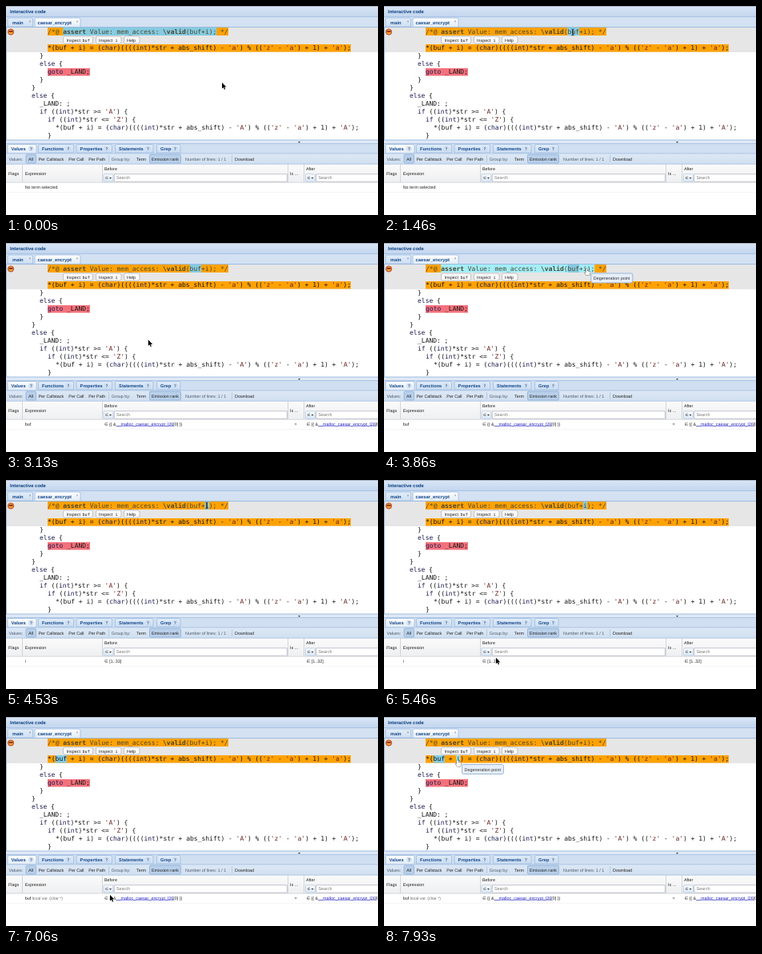
Recreate the animation shown at these times as an HTML page with a canvas. Size 465 px wide and 262 px high, loop 8000 ms.

```html
<!DOCTYPE html>
<html lang="en">
<head>
<meta charset="utf-8">
<title>Interactive code</title>
<style>
html, body { margin: 0; width: 100%; height: 100%; overflow: hidden; background: #fff; }
canvas { display: block; width: 465px; height: 262px; }
</style>
</head>
<body>
<canvas id="stage"></canvas>
<script>
const LOOP = 8000, W = 465, H = 262, PITCH = 4.8;
const SANS = '"Liberation Sans", Arial, sans-serif';
const MONO = '"DejaVu Sans Mono", monospace';
const BLUE = '#15498b', LINE = '#9dbbe0', HOVER = '#a3eef7', SELECTED = '#85cbe0', ORANGE = '#ffa200';

const canvas = document.getElementById('stage');
const ctx = canvas.getContext('2d');
const scale = window.devicePixelRatio || 1;
canvas.width = W * scale;
canvas.height = H * scale;

// Highlightable terms: x, y, width, height
const terms = {
  buf1: [229.6, 27, 14.4, 10],
  i1: [248.8, 27, 4.8, 10],
  assert: [71.2, 27, 192, 10],
  buf2: [61.6, 48, 14.4, 9.5],
  i2: [90.4, 48, 4.8, 9.5],
  assign: [52, 48, 379, 9.5]
};

// Pointer path: time, x, y, shape on arrival
const path = [
  [0, 270, 96, 'arrow'], [600, 270, 96, 'arrow'],
  [1250, 236, 33, 'beam'], [1750, 236, 33, 'beam'],
  [2250, 97.5, 215, 'arrow'], [2750, 97.5, 215, 'arrow'],
  [3500, 254.3, 32, 'hand'], [3950, 254.3, 32, 'hand'],
  [4150, 251, 32, 'beam'], [4650, 251, 32, 'beam'],
  [5200, 140, 223, 'arrow'], [5450, 140, 223, 'arrow'],
  [6000, 70, 51, 'hand'], [6650, 70, 51, 'hand'],
  [7050, 130, 223, 'arrow'], [7250, 130, 223, 'arrow'],
  [7700, 93, 53.5, 'hand'], [LOOP, 93, 53.5, 'hand']
];
const tooltips = [[3600, 3980], [6130, 6640], [7780, LOOP]];
const selections = [[0, 'assert'], [1400, 'buf1'], [4350, 'i1'], [6550, 'buf2']];
const results = [[0, 'none'], [1650, 'buf'], [4400, 'i'], [6650, 'local']];

const stateAt = (list, t) => list.filter(([start]) => start <= t).pop()[1];

function rect(x, y, w, h, fill, stroke, radius = 0) {
  ctx.beginPath();
  ctx.roundRect(x, y, w, h, radius);
  if (fill) { ctx.fillStyle = fill; ctx.fill(); }
  if (stroke) { ctx.strokeStyle = stroke; ctx.lineWidth = 0.8; ctx.stroke(); }
}

function shade(x, y, w, h, top, bottom, stroke, radius) {
  const g = ctx.createLinearGradient(0, y, 0, y + h);
  g.addColorStop(0, top);
  g.addColorStop(1, bottom);
  rect(x, y, w, h, g, stroke, radius);
}

function text(str, x, y, { size = 5.4, color = '#222', weight = '', family = SANS } = {}) {
  ctx.font = `${weight} ${size}px ${family}`;
  ctx.fillStyle = color;
  ctx.fillText(str, x, y);
  return x + ctx.measureText(str).width;
}

function code(str, x, y) {
  for (const m of str.matchAll(/'.'|\w+|[^\w\s']+/g)) {
    const color = m[0][0] === "'" ? '#6a2020' : /^(if|else|goto|int|char)$/.test(m[0]) ? '#1c1c50' : '#151515';
    text(m[0], x + m.index * PITCH, y, { size: 8, family: MONO, color });
  }
}

function triangle(x, y) {
  ctx.fillStyle = '#333';
  ctx.beginPath();
  ctx.moveTo(x, y);
  ctx.lineTo(x + 3, y);
  ctx.lineTo(x + 1.5, y + 1.8);
  ctx.fill();
}

function topPanel() {
  shade(0, 0, W, 13, '#d9e6f6', '#c3d6ee');
  rect(0, 0, W, 1, '#aab6c6');
  text('Interactive code', 5, 8.7, { size: 5.9, weight: 'bold', color: '#0b3f80' });
  rect(0, 13, W, 14, '#d3e1f2');
  rect(0, 13, W, 0.7, LINE);
  shade(2, 15, 31.5, 11, '#e2edf9', '#cfdff2', LINE, [2, 2, 0, 0]);
  shade(36, 15, 57, 12, '#ffffff', '#dfeaf7', LINE, [2, 2, 0, 0]);
  const label = { size: 5.8, weight: 'bold', color: BLUE };
  text('main', 8, 22.6, label);
  text('caesar_encrypt', 39.5, 22.6, label);
  text('×', 28.5, 20.5, { size: 5, color: '#777' });
  text('×', 87.5, 20.5, { size: 5, color: '#777' });
  rect(0, 26, W, 1, LINE);
}

function codePanel(hover, selected) {
  rect(0, 27, W, 141, '#fff');
  rect(0, 27, W, 31, '#e6e6e6');
  rect(52, 27, 226, 10, ORANGE);
  rect(52, 48, 379, 9.5, ORANGE);
  rect(52, 78, 53, 9.5, '#f4717c');
  if (hover) rect(...terms[hover], HOVER);
  rect(...terms[selected], SELECTED);

  ctx.beginPath();
  ctx.arc(6, 32.5, 3.6, 0, 7);
  ctx.fillStyle = '#f0a030';
  ctx.fill();
  ctx.strokeStyle = '#b8402a';
  ctx.lineWidth = 1;
  ctx.stroke();
  rect(3.5, 31, 5, 1.7, '#7a2a1a');

  [['/*@', 0], ['assert', 4, 'bold'], ['Value: mem_access:', 11], ['\\valid', 30, 'bold'], ['(buf+i);', 36], ['*/', 45]]
    .forEach(([str, column, weight]) => text(str, 52 + column * PITCH, 34.6,
      { size: 8, family: MONO, weight, color: '#4a4632' }));

  const assign = c => `*(buf + i) = (char)((((int)*str + abs_shift) - '${c}') % (('z' - 'a') + 1) + '${c}');`;
  [
    [52, assign('a')], [42, '}'], [42, 'else {'], [52, 'goto _LAND;'], [42, '}'], [32, '}'],
    [32, 'else {'], [42, '_LAND: ;'], [42, "if ((int)*str >= 'A') {"],
    [52, "if ((int)*str <= 'Z') {"], [62, assign('A')], [52, '}']
  ].forEach(([x, str], row) => code(str, x, 55 + row * 10));

  for (const [x, w] of [[71.5, 37], [112.5, 31.5], [147.5, 19.5]])
    rect(x, 38, w, 9, '#fafafa', '#b8b8b8', 2);
  text('Inspect', 75.5, 44.6);
  text('buf', 95.5, 44.6, { size: 5.2, family: MONO });
  text('Inspect', 116, 44.6);
  text('i', 136.5, 44.6, { size: 5.2, family: MONO });
  text('Help', 151, 44.6);
  rect(0, 27, 1, 141, LINE);
}

function toolbars() {
  rect(0, 168, W, 5, '#dfe9f5');
  rect(0, 167.5, W, 0.9, LINE);
  triangle(365, 170);
  rect(0, 172.5, W, 13, '#d0dff1');
  rect(0, 172.3, W, 0.8, LINE);
  [['Values', 2, 36], ['Functions', 40.5, 44], ['Properties', 88, 44.5], ['Statements', 136.5, 47.5], ['Grep', 188.5, 29.5]]
    .forEach(([name, x, w], i) => {
      shade(x, 173.5, w, i ? 10.5 : 11.5, i ? '#e0ecf9' : '#ffffff', i ? '#cbddf2' : '#e0eaf6', LINE, [2, 2, 0, 0]);
      text(name, x + 4.6, 180.6, { size: 5.7, weight: 'bold', color: BLUE });
      rect(x + w - 9.5, 176, 5.5, 5.5, '#e9f1fb', '#bacfe9', 2.5);
      text('?', x + w - 8.3, 180.7, { size: 5.2, weight: 'bold', color: BLUE });
    });
  shade(0, 184.8, W, 13.5, '#dde8f5', '#d0dff0');
  rect(0, 184.6, W, 0.7, LINE);
  rect(25, 186, 12.5, 11, '#b9d0ea', '#8eaed6', 1.5);
  rect(179.5, 186, 39, 11, '#b9d0ea', '#8eaed6', 1.5);
  [['Values:', 3.5], ['All', 28], ['Per Callstack', 40.5], ['Per Call', 78.3], ['Per Path', 103.2], ['Group by:', 131.8],
    ['Term', 163], ['Emission rank', 182], ['Number of lines: 1 / 1', 224], ['Download', 286]]
    .forEach(([str, x]) => text(str, x, 193.6, { color: /[s:y]:/.test(str) ? '#4c5a6c' : '#222' }));
  for (const x of [128, 282]) rect(x, 187, 0.7, 9, '#a9c0dc');
}

function searchBox(x, w) {
  shade(x, 210.7, 12, 9.5, '#fafcff', '#dce8f6', '#b7c9df', 1);
  text('∈', x + 2, 217.2, { size: 4.6 });
  triangle(x + 7, 215);
  rect(x + 13.3, 210.7, w, 9.5, '#fff', '#b5b8c8');
  text('Search', x + 16, 217.4, { color: '#777' });
}

function pointerValue(x) {
  x = text('∈ {{ &', x, 228.8, { size: 5.3 });
  const end = text('__malloc_caesar_encrypt_l26', x, 228.8, { color: '#2424c0' });
  rect(x, 229.5, end - x, 0.5, '#2424c0');
  text('[0] }}', end, 228.8);
}

function table(result, headerHover) {
  rect(0, 198, W, 64, '#fff');
  shade(0, 198, W, 23, '#fbfbfb', '#eeeff1');
  if (headerHover) shade(20.5, 198, 99.5, 23, '#f0f7ff', '#d8e9fb');
  rect(0, 197.8, W, 0.7, LINE);
  rect(0, 220.7, W, 0.7, '#c8ccd2');
  for (const x of [20, 120, 352, 372]) rect(x, 198, 0.7, 23, '#c5c8ce');
  [['Flags', 3, 212], ['Expression', 23.7, 212], ['Before', 123, 206], ['Is ...', 355, 212], ['After', 375, 206]]
    .forEach(([str, x, y]) => text(str, x, y));
  if (headerHover) {
    rect(112.5, 198.5, 7.5, 22, '#c9def5');
    triangle(114.8, 209);
  }
  searchBox(122, 216);
  searchBox(374.5, 90);

  rect(0, 233, W, 0.6, '#ededed');
  if (result === 'none') {
    text('No term selected', 23.7, 228.8);
  } else if (result === 'i') {
    text('i', 23.7, 228.8);
    text('∈ [1..33]', 123, 228.8);
    text('∈ [1..32]', 375.5, 228.8);
  } else {
    const end = text('buf', 23.7, 228.8);
    if (result === 'local') text('local var. (char *)', end + 1.5, 228.8, { size: 5.1, color: '#666' });
    pointerValue(123);
    text('=', 360.5, 228.8);
    pointerValue(375.5);
  }
}

const shapes = {
  arrow: new Path2D('M0 0V7.6L1.8 6L3 8.8L4.2 8.3L3 5.6H5.4Z'),
  beam: new Path2D('M-1.6 -4Q0 -4 0 -3V3Q0 4 -1.6 4M1.6 -4Q0 -4 0 -3V3Q0 4 1.6 4'),
  hand: new Path2D('M-.8 .6Q0 -.6 .8 .6V3L3.8 3.7Q4.6 4 4.4 5.2L3.6 8.4H-.6L-2.6 5.2Q-2.4 4.2 -.8 5.2Z')
};

function drawPointer({ x, y, shape }) {
  ctx.save();
  ctx.translate(shape === 'hand' ? x - 1 : x, y);
  ctx.lineJoin = 'round';
  ctx.lineWidth = shape === 'arrow' ? 1.3 : 0.8;
  ctx.strokeStyle = shape === 'arrow' ? '#fff' : '#222';
  ctx.stroke(shapes[shape]);
  if (shape !== 'beam') {
    ctx.fillStyle = shape === 'arrow' ? '#000' : '#fff';
    ctx.fill(shapes[shape]);
  }
  ctx.restore();
}

function pointerAt(t) {
  const next = path.findIndex(key => key[0] > t);
  const [t0, x0, y0, shape0] = path[next - 1], [t1, x1, y1, shape1] = path[next];
  const p = (t - t0) / (t1 - t0), e = p * p * (3 - 2 * p);
  return { x: x0 + (x1 - x0) * e, y: y0 + (y1 - y0) * e, shape: shape0 === shape1 ? shape0 : 'arrow' };
}

function termAt({ x, y }) {
  return Object.keys(terms).find(name => {
    const [left, top, w, h] = terms[name];
    return x >= left && x < left + w && y >= top && y < top + h;
  });
}

function draw(t) {
  const pointer = pointerAt(t);
  ctx.setTransform(scale, 0, 0, scale, 0, 0);
  ctx.textRendering = 'geometricPrecision';
  topPanel();
  codePanel(termAt(pointer), stateAt(selections, t));
  toolbars();
  table(stateAt(results, t), pointer.y > 198 && pointer.y < 221 && pointer.x > 20 && pointer.x < 120);
  if (tooltips.some(([from, to]) => t >= from && t < to)) {
    const x = pointer.x + 4.5, y = pointer.y + 6;
    rect(x, y, 52, 12, '#e6eef9', '#8aa7cf', 2);
    text('Degeneration point', x + 3, y + 8, { color: '#333' });
  }
  drawPointer(pointer);
}

function tick() {
  draw(performance.now() % LOOP);
  requestAnimationFrame(tick);
}
tick();
</script>
</body>
</html>
```
